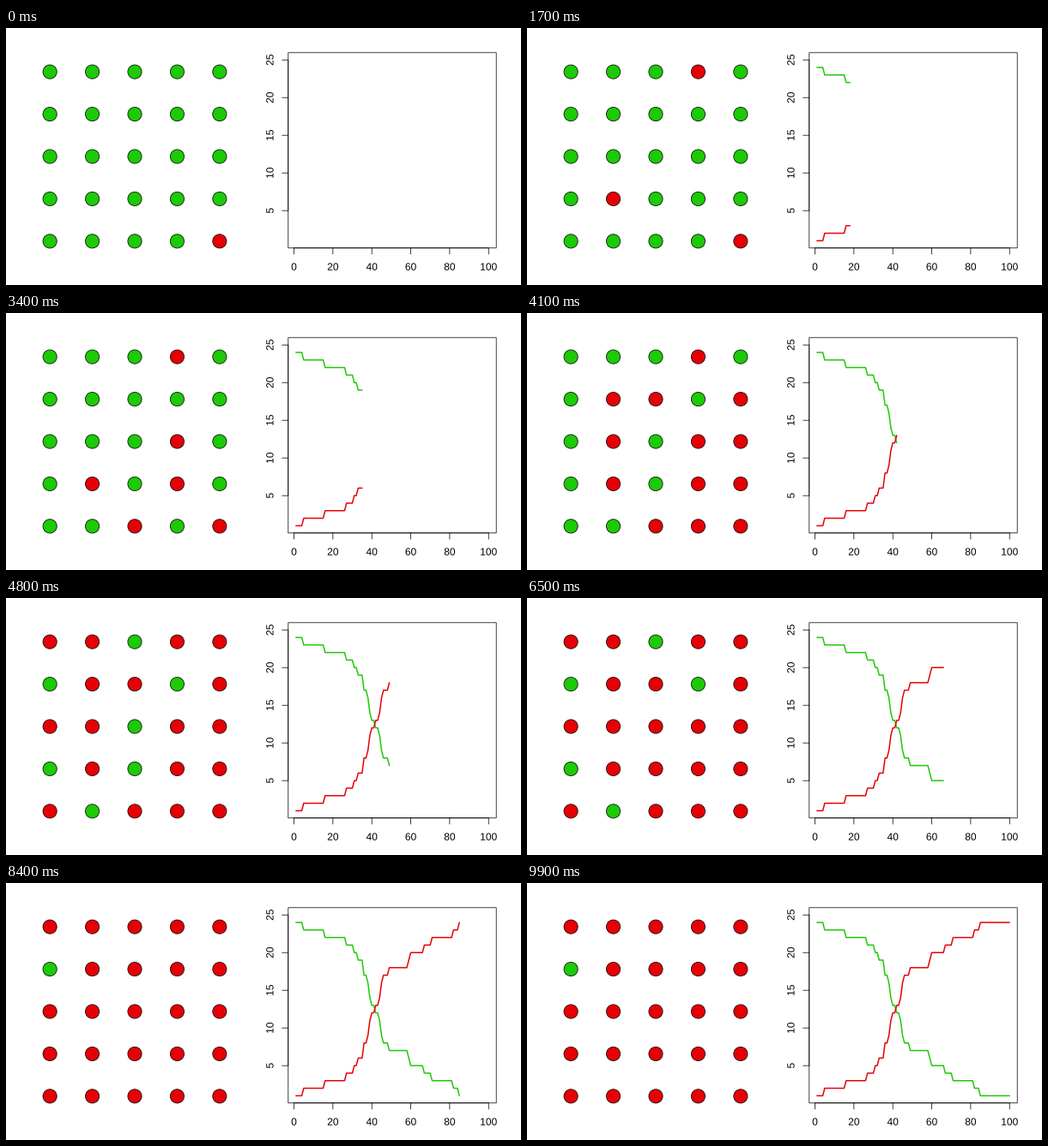
Recreate the animation shown at these times as a matplotlib script. Size 600 px wide and 300 px high, loop 10 s.

```python
import numpy as np
import matplotlib.pyplot as plt
from matplotlib.animation import FuncAnimation
from matplotlib.patches import Circle, PathPatch, Rectangle
from matplotlib.textpath import TextPath
from matplotlib.transforms import Affine2D

plt.rcParams["font.family"] = "Liberation Sans"
plt.rcParams["path.simplify"] = False

W, H, DPI = 600, 300, 100
N, SIDE = 100, 5
PT = 72 / DPI  # points per pixel
GREEN, RED = "#1cca05", "#e60005"
THIN, THICK = 0.75 * PT, 1.5 * PT

# The step at which each dot turns red; the curves follow from it
NEVER = N + 1
TURN = np.array([
    [49, 45, 67, 5, 44],
    [NEVER, 40, 39, 82, 36],
    [45, 42, 59, 31, 38],
    [71, 16, 60, 27, 36],
    [46, 85, 33, 39, 1],
])
steps = np.arange(1, N + 1)
sick = np.array([(TURN <= s).sum() for s in steps])

# Plot region in lines of text, 4% padding around the data
FONT = 12
LINE = 1.2 * FONT
LEFT, RIGHT = W / 2 + 2 * LINE, W - 2 * LINE
TOP, BOTTOM = 2 * LINE, H - 3 * LINE
TICK = LINE / 2


def padded(v, lo, hi):
    return ((v - lo) / (hi - lo) + 0.04) / 1.08


def px(x):
    return LEFT + padded(x, 1, N) * (RIGHT - LEFT)


def py(y):
    return BOTTOM - padded(y, 1, SIDE ** 2) * (BOTTOM - TOP)


fig = plt.figure(figsize=(W / DPI, H / DPI), dpi=DPI, facecolor="white")
ax = fig.add_axes([0, 0, 1, 1])
ax.set_xlim(0, W)
ax.set_ylim(H, 0)
ax.axis("off")


def stroke(xs, ys, color="black", width=THIN):
    line, = ax.plot(xs, ys, color=color, lw=width, snap=False,
                    solid_capstyle="round", solid_joinstyle="round")
    return line


def label(x, y, value, angle=0):
    """Number centred on x, y along its baseline."""
    text = str(value)
    half = len(text) * 0.556 * FONT / 2
    place = Affine2D().translate(-half, 0).scale(1, -1)
    place.rotate_deg(-angle).translate(x, y)
    path = TextPath((0, 0), text, size=FONT).transformed(place)
    ax.add_patch(PathPatch(path, fc="black", lw=0, snap=False))


def draw_axes():
    ax.add_patch(Rectangle((LEFT, TOP), RIGHT - LEFT, BOTTOM - TOP, fill=False,
                           ec="black", lw=THIN, snap=False))
    stroke([px(0), px(100)], [BOTTOM, BOTTOM])
    stroke([LEFT, LEFT], [py(5), py(25)])
    for v in range(0, 101, 20):
        stroke([px(v), px(v)], [BOTTOM, BOTTOM + TICK])
        label(px(v), BOTTOM + 1.8 * LINE, v)
    for v in range(5, 26, 5):
        stroke([LEFT, LEFT - TICK], [py(v), py(v)])
        label(LEFT - 1.2 * LINE, py(v), v, angle=90)


def add_dot(row, col):
    gap = 49.44
    dot = Circle((150 + (col - 2) * gap, 150 + (row - 2) * gap), 8.1,
                 fc=GREEN, ec="black", lw=THIN, snap=False)
    return ax.add_patch(dot)


draw_axes()
dots = [add_dot(r, c) for r in range(SIDE) for c in range(SIDE)]
healthy_line = stroke([], [], GREEN, THICK)
sick_line = stroke([], [], RED, THICK)


def update(i):
    now = i + 1
    for dot, turn in zip(dots, TURN.flat):
        dot.set_facecolor(RED if turn <= now else GREEN)
    n = now if now > 1 else 0  # one point makes no line
    xs = px(steps[:n])
    healthy_line.set_data(xs, py(SIDE ** 2 - sick[:n]))
    sick_line.set_data(xs, py(sick[:n]))
    return [*dots, healthy_line, sick_line]


anim = FuncAnimation(fig, update, frames=N, interval=100, repeat=True,
                     repeat_delay=0, blit=False)
plt.show()
```
